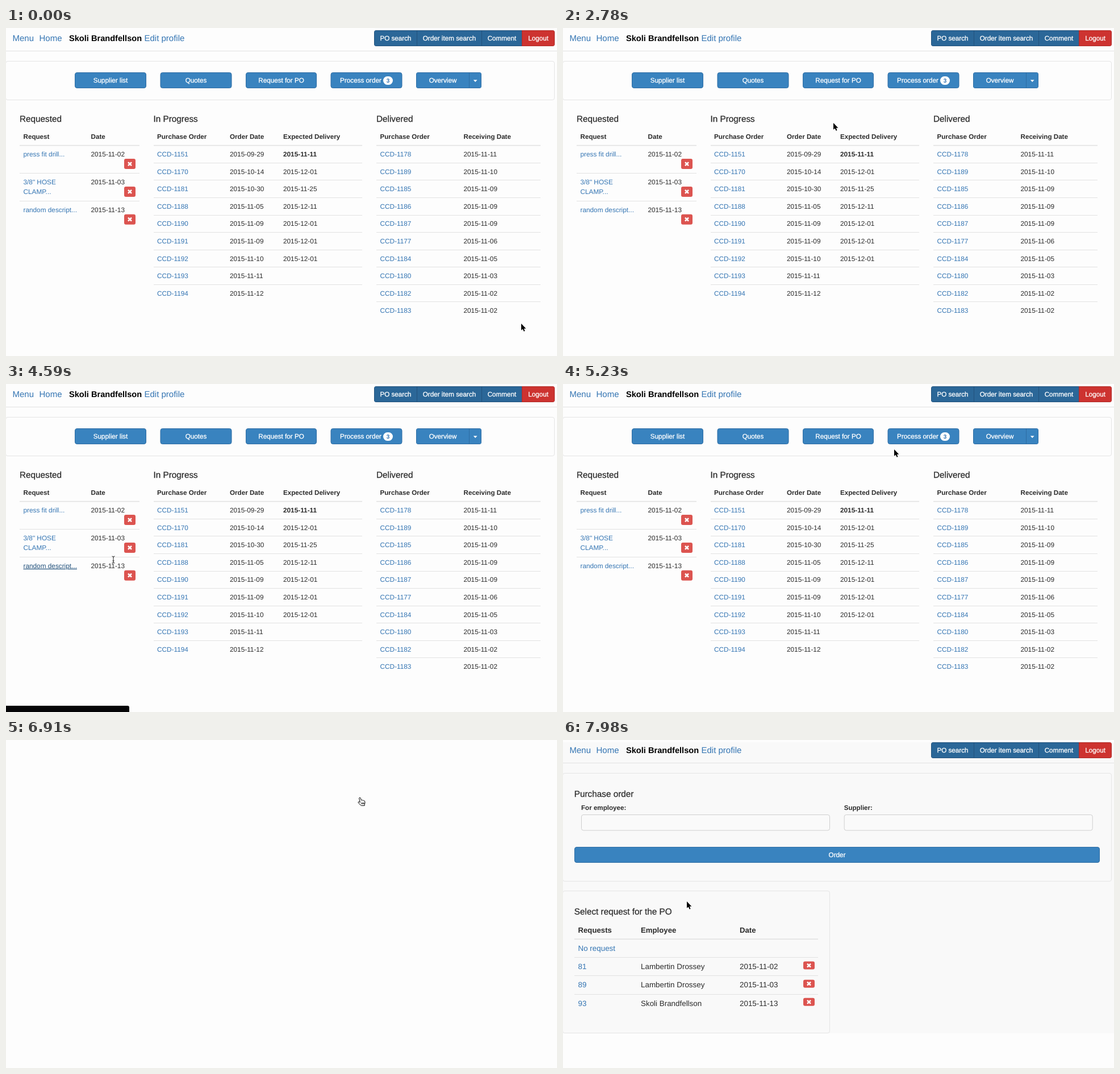
Write an HTML page that moves like this. It is 970x577 px and loops after 8 s.

```html
<!DOCTYPE html>
<html lang="en">
<head>
<meta charset="utf-8">
<title>Purchase orders</title>
<style>
  html, body { margin: 0; width: 100%; height: 100%; overflow: hidden; background: #fdfdfd; }
  svg { display: block; width: 100vw; height: 100vh; }
  text { font-family: "Liberation Sans", Arial, sans-serif; fill: #2b2b2b; text-rendering: geometricPrecision; }
  .b { font-weight: bold; }
  .user { font-weight: bold; fill: #000; }
  .head { stroke: #2b2b2b; stroke-width: .25px; }
  .link { fill: #3475b3; }
  .on-blue { fill: #fff; stroke: #fff; stroke-width: .3px; text-anchor: middle; }
  .btn { fill: #3983bf; stroke: #2e6da4; }
  .dark, .hot .btn { fill: #2b6798; stroke: #22527c; }
  .hot .link { fill: #23527c; text-decoration: underline; }
  .red { fill: #cd3330; stroke: #b02a27; }
  .panel { fill: none; stroke: #e5e5e5; }
  .input { fill: #fafafa; stroke: #cfcfcf; }
</style>
</head>
<body>
<svg id="stage" viewBox="0 0 970 577"></svg>
<script>
const LOOP = 8000, BLANK = 6910, FORM = 7210;
const USER = 'Skoli Brandfellson', CLERK = 'Lambertin Drossey';

const text = (x, y, size, s, cls = '') => `<text x="${x}" y="${y}" font-size="${size}" class="${cls}">${s}</text>`;
const head = (x, y, s) => text(x, y, 15.3, s, 'head');
const box = (x, y, w, h, cls, r = 3.5) =>
  `<rect x="${x + .5}" y="${y + .5}" width="${w - 1}" height="${h - 1}" rx="${r}" class="${cls}"/>`;
const rule = (x1, x2, y, h = 1) => `<rect x="${x1}" y="${y}" width="${x2 - x1}" height="${h}" fill="#e2e2e2"/>`;
const button = (x, y, w, label, cls = 'btn', r) =>
  box(x, y, w, 28, cls, r) + text(x + w / 2, y + 18.2, 11.7, label, 'on-blue');
const remove = (cx, cy, h) =>
  `<rect x="${cx - 10}" y="${cy - h / 2}" width="20" height="${h}" rx="3" fill="#dc5450"/>
   <path d="M${cx - 3} ${cy - 3}l6 6m0-6l-6 6" stroke="#fff" stroke-width="2.6"/>`;

// Joined buttons: only the outer corners are round
const joined = (id, x, y, w, parts) =>
  `<clipPath id="${id}"><rect x="${x}" y="${y}" width="${w}" height="28" rx="4"/></clipPath>
   <g clip-path="url(#${id})">${parts}</g>`;

// Header cells, a thick rule, then evenly spaced rows; the first column links, * marks bold
function table(x1, x2, cols, heads, rows, { top, step, headSize, size }) {
  let out = rule(x1, x2, top - .5, 1.6);
  heads.forEach((h, i) => out += text(cols[i], top - 11.3, headSize, h, 'b'));
  rows.forEach((row, r) => {
    const y = top + r * step;
    if (r) out += rule(x1, x2, Math.round(y));
    row.forEach((s, i) => out += text(cols[i], y + step * .65, size, s.replace('*', ''),
      i ? (s[0] === '*' ? 'b' : '') : 'link'));
  });
  return out;
}

const small = { top: 206.3, step: 30.56, headSize: 11.65, size: 11.8 };
const large = { top: 350, step: 32.2, headSize: 13.2, size: 13.4 };
const day = d => d[0] === '*' ? '*2015-' + d.slice(1) : '2015-' + d;
const orders = (...lines) => lines.map(line => {
  const [id, ...days] = line.split(' ');
  return ['CCD-' + id, ...days.map(day)];
});

const nav = text(11.5, 22.5, 15, 'Menu', 'link') + text(58.5, 22.5, 15, 'Home', 'link') +
  text(111, 22.5, 14.6, USER, 'user') + text(243.5, 22.5, 15, 'Edit profile', 'link') + rule(0, 970, 40) +
  joined('tools', 648, 4, 318,
    button(648, 4, 76, 'PO search', 'dark', 0) + button(723, 4, 115, 'Order item search', 'dark', 0) +
    button(837, 4, 72, 'Comment', 'dark', 0) + button(908, 4, 58, 'Logout', 'red', 0));

const requested = head(24, 165, 'Requested') +
  text(30.5, 195, 11.65, 'Request', 'b') + text(149.5, 195, 11.65, 'Date', 'b') + rule(24, 235, 205.8, 1.6) +
  [['press fit drill...'], ['3/8" HOSE', 'CLAMP...'], ['random descript...']].map((lines, i) => {
    const y = 226.3 + i * 48.8;
    return `<g id="request${i}">${lines.map((s, n) => text(30.5, y + n * 16.5, 11.8, s, 'link')).join('')}</g>` +
      text(149.5, y, 11.8, day(['11-02', '11-03', '11-13'][i])) +
      remove(218, y + 12.8, 18) + (i ? rule(24, 235, Math.round(y - 20)) : '');
  }).join('');

const home = box(-1, 58, 967, 69, 'panel') +
  button(121, 78, 126, 'Supplier list') + button(271.5, 78, 126, 'Quotes') + button(422, 78, 125, 'Request for PO') +
  `<rect id="ring" x="570" y="77" width="129" height="31" rx="5" fill="#72b5f0"/>
   <g id="process">${box(571.5, 78, 126, 28, 'btn')}</g>` + text(624.5, 96.2, 11.7, 'Process order', 'on-blue') +
  `<rect x="664" y="85" width="17" height="15" rx="7.5" fill="#fff"/>
   <text x="672.5" y="96.2" font-size="10" class="b link" text-anchor="middle">3</text>` +
  joined('split', 722, 78, 115, button(722, 78, 94, 'Overview', 'btn', 0) + box(815, 78, 22, 28, 'btn', 0)) +
  '<path d="M822.8 91.3h6.8l-3.4 3.6z" fill="#fff"/>' +
  requested +
  head(259.5, 165, 'In Progress') +
  table(260, 627, [266, 394, 488], ['Purchase Order', 'Order Date', 'Expected Delivery'], orders(
    '1151 09-29 *11-11', '1170 10-14 12-01', '1181 10-30 11-25', '1188 11-05 12-11', '1190 11-09 12-01',
    '1191 11-09 12-01', '1192 11-10 12-01', '1193 11-11', '1194 11-12'), small) +
  head(652, 165, 'Delivered') +
  table(652, 941, [658.5, 805.5], ['Purchase Order', 'Receiving Date'], orders(
    '1178 11-11', '1189 11-10', '1185 11-09', '1186 11-09', '1187 11-09',
    '1177 11-06', '1184 11-05', '1180 11-03', '1182 11-02', '1183 11-02'), small) +
  '<path id="status" d="M0 566h214q3 0 3 3v8H0z" fill="#050507"/>';

const form = box(-1, 58, 967, 191, 'panel') +
  head(19.8, 100, 'Purchase order') +
  ['For employee:', 'Supplier:'].map((s, i) =>
    text(32 + i * 462.7, 122.8, 11.6, s, 'b') + box(32 + i * 462.7, 131, 438, 28.5, 'input')).join('') +
  `<g id="order">${button(20, 188, 925, 'Order')}</g>` +
  box(-1, 265, 471, 251, 'panel') +
  head(19.8, 307, 'Select request for the PO') +
  table(20, 449, [26.5, 137, 311], ['Requests', 'Employee', 'Date'], [['No request'],
    ['81', CLERK, day('11-02')], ['89', CLERK, day('11-03')], ['93', USER, day('11-13')]], large) +
  [0, 1, 2].map(i => remove(433, 396.6 + i * 32.1, 14)).join('');

const cursors = `
  <path id="arrow" d="M0 0V11.8L2.7 9.4L4.7 13.7L6.5 12.9L4.8 8.7H8.4Z" stroke="#fff" paint-order="stroke"/>
  <path id="hand" d="M-1.4 1.2Q0-.8 1.3 1.2L2.4 5Q3.6 4 4.6 5.2Q5.8 4.4 6.6 5.8Q8 5.2 8.6 6.8Q9.6 10 8.2 12.4V14.4H2.4L-2.6 9.8Q-3.8 7.6-1.6 7.6L.3 8.8ZM3.2 9v3M5.2 9v3M7 9v3" fill="#fff" stroke="#000"/>
  <path id="beam" d="M-2.5-6Q0-6 0-4V4Q0 6-2.5 6M2.5-6Q0-6 0-4M0 4Q0 6 2.5 6M-1.5 2h3" fill="none" stroke="#222"/>`;

document.getElementById('stage').innerHTML =
  `<rect width="970" height="577" fill="#fdfdfd"/>
   <rect id="shade" y="4" width="970" height="512" fill="#f9f9f9"/>
   <g id="nav">${nav}</g><g id="home">${home}</g><g id="form">${form}</g><g id="cursor">${cursors}</g>`;

// Pointer moves: start, end, then where it comes to rest
const moves = [
  [0, 50, 902, 516], [155, 830, 570, 163], [2125, 2630, 476, 167], [2780, 2900, 483, 166],
  [3335, 3560, 20, 388], [3695, 4300, 118, 317], [4425, 4590, 189, 309],
  [4650, 5230, 583, 115], [5275, 5530, 623, 101], [7315, 7980, 218, 284]
];

function pointer(t) {
  let x = 907, y = 520;
  for (const [from, to, tx, ty] of moves) {
    const p = Math.min(1, Math.max(0, (t - from) / (to - from)));
    const k = p * p * (3 - 2 * p);
    x += (tx - x) * k;
    y += (ty - y) * k;
  }
  return [x, y];
}

const inside = ([x, y], left, top, w, h) => x >= left && x < left + w && y >= top && y < top + h;
const overLink = p => inside(p, 30, 312, 96, 20);

// What lies under the pointer; it keeps its shape until it moves on the new page
function hover(t, p) {
  if (t < moves.at(-1)[0] + 45) {
    if (overLink(p)) return 'request2';
    if (inside(p, 571, 78, 126, 28)) return 'process';
    return inside(p, 149, 305, 62, 20) ? 'words' : '';
  }
  if (inside(p, 20, 188, 925, 28)) return 'order';
  return inside(p, 32, 131, 438, 28) || inside(p, 495, 131, 438, 28) ? 'words' : '';
}

const el = id => document.getElementById(id);
const show = (id, on) => el(id).style.display = on ? '' : 'none';
const hot = (id, on) => el(id).classList.toggle('hot', on);

function draw(t) {
  const p = pointer(t), under = hover(t, p);
  const lateLink = overLink(pointer(t - 200));
  show('nav', t < BLANK || t >= FORM);
  show('home', t < BLANK);
  show('form', t >= FORM);
  show('shade', t >= FORM);
  show('status', lateLink);
  show('ring', t >= 6370);
  hot('request2', lateLink || under === 'request2');
  hot('process', under === 'process');
  hot('order', under === 'order');
  const kind = !under ? 'arrow' : under === 'words' ? 'beam' : 'hand';
  for (const id of ['arrow', 'hand', 'beam']) show(id, id === kind);
  el('cursor').setAttribute('transform', `translate(${p})`);
}

const start = performance.now();
function frame(now) {
  draw(Math.max(0, now - start) % LOOP);
  requestAnimationFrame(frame);
}
draw(0);
requestAnimationFrame(frame);
</script>
</body>
</html>
```
